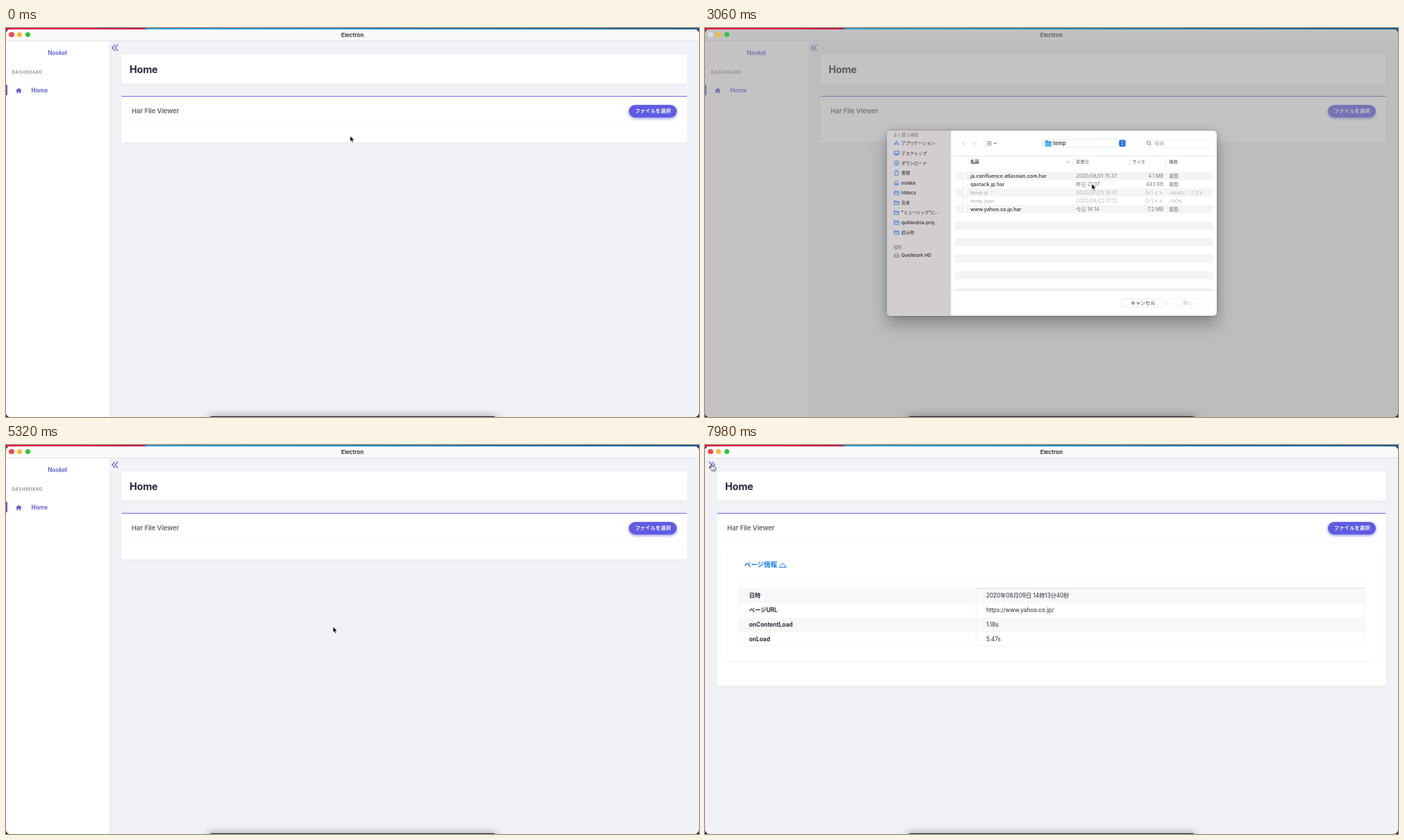
Write an HTML page that moves like this. It is 998 by 561 pixels and loops after 8 s.

```html
<!DOCTYPE html>
<html lang="ja">
<head>
<meta charset="utf-8">
<title>Har File Viewer</title>
<style>
html, body { margin: 0; width: 100%; height: 100%; overflow: hidden; background: #11131f; }
body { font: 8.3px/1 Inter, "Noto Sans CJK JP", sans-serif; color: #2b2b3f; }
div, svg { position: absolute; box-sizing: border-box; }
#stage { left: 0; top: 0; width: 998px; height: 561px; overflow: hidden; cursor: default; }
#stage, #stage * { animation-duration: 8s; animation-iteration-count: infinite; animation-timing-function: linear; }
.t { white-space: nowrap; transform: translateY(-50%); }
.b { font-weight: 700; }
.sb { font-weight: 600; }

/* desktop and window */
.strip { inset: 0 0 auto; height: 3px; background: linear-gradient(90deg, #e3164a 0 108px, #b8164c 200px, #2a9ad6 201px, #2388c4 480px, #0b5a94); }
.window { inset: 1.5px 0 0; border-radius: 6px; overflow: hidden; background: #f1f2f7; }
.page { left: 0; top: -1.5px; width: 998px; height: 561px; }
.bar { left: 0; top: 0; width: 998px; height: 18.5px; background: #fafafa; border-bottom: 1px solid #e1e1e3; }
.light { width: 7.2px; height: 7.2px; top: 6.2px; border-radius: 50%; }
.red { background: #f9484d; animation-name: red; }
.side { left: 0; top: 18.5px; width: 149px; height: 543px; background: #fff; box-shadow: 0 2px 5px #0000000a; animation-name: side; }
.side .t { margin-top: -18.5px; }
.violet { color: #5a55dc; }
.main { left: 149px; top: 0; right: 0; height: 561px; animation-name: main; }
.card { left: 17.3px; right: 17.3px; background: #fff; box-shadow: 0 2px 5px #00000008; border-radius: 1.5px; }
.viewer { top: 98px; height: 66.5px; border-top: 1.6px solid #6d69d8; animation-name: grow; animation-timing-function: step-end !important; }
.pill { left: 748.5px; top: 111px; width: 69px; height: 18px; }
.btn { right: 31.6px; top: 111px; width: 69px; height: 18px; border-radius: 9px; background: #5f5be3;
  color: #fff; font: 700 7.13px/17.4px Inter, "Noto Sans CJK JP", sans-serif; letter-spacing: .3px; text-align: center; white-space: nowrap;
  box-shadow: 0 1.5px 4px #8d89e6; animation-name: btn; }
.info { inset: 0; animation-name: info; animation-timing-function: step-end !important; }
.panel { left: 32px; right: 31px; top: 150px; height: 161px; box-shadow: 0 2px 5px #00000008; }
.table { left: 47.5px; right: 47.5px; top: 206px; height: 84px; border: .6px solid #f4f4f5; }
.row { left: 0; right: 0; height: 21px; }
.row:nth-child(odd) { background: #f8f8f8; }
.row .t { top: 10px; }
.row .v { left: calc(37.9% + 15px); letter-spacing: -.08px; }
.edge { left: 37.9%; right: 0; top: -1px; height: 1px; background: #dcdee2; }
.split { left: 37.9%; top: 0; bottom: 0; width: .6px; background: #f1f1f3; }
.chev { fill: none; stroke: #5753cf; stroke-width: 1.1; }
.left { animation-name: before; animation-timing-function: step-end !important; }
.right { animation-name: after; animation-timing-function: step-end !important; }
.wash { inset: 0; background: #fff; opacity: 0; animation-name: wash; }
.dim { inset: 0; background: #000; opacity: 0; animation-name: dim; }
.dock { left: 290px; top: 559.6px; width: 418px; height: 20px; border-radius: 7px; background: #24213f; box-shadow: 0 0 13px #0000005c, 0 0 1px #555; }

/* file sheet */
.sheet { left: 261.7px; top: 148.4px; width: 475.3px; height: 266.2px; border-radius: 5px; overflow: hidden; background: #fff;
  box-shadow: 0 12px 24px #0000004a, 0 0 12px #00000022, 0 0 0 .5px #00000030; opacity: 0; animation-name: sheet; }
.sheet svg { left: 0; top: 0; }
.sheet text { font-family: Inter, "Noto Sans CJK JP", sans-serif; }
.places { animation-name: places; }
.on, .blank { opacity: 0; animation-timing-function: step-end !important; }
.on { animation-name: pick; }
.blank { inset: 0; background: linear-gradient(#f1f1f2, #eeeeef 30px, #e9eaed 38px); animation-name: blank; }

/* pointer */
.pointer { left: 0; top: 0; width: 0; height: 0; animation-name: pointer; animation-timing-function: ease-in-out !important; }
.pointer svg { overflow: visible; left: 0; top: 0; animation-timing-function: step-end !important; }
.arrow { animation-name: arrow; }
.hand { animation-name: hand; }

@keyframes pointer {
  0%, 4.5% { transform: translate(495.5px, 155.5px); }
  12.8%, 24% { transform: translate(907.2px, 121.5px); }
  32.2%, 35% { transform: translate(602px, 205px); }
  43%, 67.5% { transform: translate(471px, 262px); }
  77.5%, 88.8% { transform: translate(156.3px, 26px); }
  96%, 100% { transform: translate(9.6px, 27.5px); }
}
@keyframes arrow { 0% { opacity: 1; } 12.2% { opacity: 0; } 25.3% { opacity: 1; } 76.6% { opacity: 0; } 90% { opacity: 1; } 95.4%, 100% { opacity: 0; } }
@keyframes hand { 0% { opacity: 0; } 12.2% { opacity: 1; } 25.3% { opacity: 0; } 76.6% { opacity: 1; } 90% { opacity: 0; } 95.4%, 100% { opacity: 1; } }
@keyframes btn {
  0%, 12.2% { background: #5f5be3; box-shadow: 0 1.5px 4px #8d89e6; }
  13.2%, 35% { background: #3a36da; box-shadow: 0 0 0 #8d89e600; }
  36.5%, 67% { background: #5f5be3; box-shadow: 0 1.5px 4px #8d89e6; }
  68%, 90% { background: #5551e6; box-shadow: 0 .5px 1px #8d89e666; }
  92%, 100% { background: #5f5be3; box-shadow: 0 1.5px 4px #8d89e6; }
}
@keyframes dim { 0%, 31.9% { opacity: 0; } 33.25%, 35% { opacity: .13; } 36.5%, 59.5% { opacity: .235; } 61% { opacity: .13; } 62.5%, 100% { opacity: 0; } }
@keyframes wash { 0%, 35% { opacity: 0; } 36.5%, 59.5% { opacity: .36; } 61% { opacity: .2; } 62.5%, 100% { opacity: 0; } }
@keyframes red { 0%, 31.9% { background: #f9484d; } 33%, 61.5% { background: #dedede; } 62.5%, 100% { background: #f9484d; } }
@keyframes sheet {
  0%, 31.9% { opacity: 0; transform: translateY(-20px); }
  33% { opacity: 1; }
  33.25%, 35% { transform: translateY(-9.5px); }
  36.5%, 59.5% { transform: none; }
  61% { opacity: 1; transform: translateY(-8.5px); }
  62.5%, 100% { opacity: 0; transform: translateY(-20px); }
}
@keyframes places { 0%, 35% { fill: #e0dbde; } 36.5%, 100% { fill: #d3cdd0; } }
@keyframes pick { 0% { opacity: 0; } 46% { opacity: 1; } 64%, 100% { opacity: 0; } }
@keyframes blank { 0% { opacity: 0; } 59.5% { opacity: 1; } 64%, 100% { opacity: 0; } }
@keyframes grow { 0% { height: 66.5px; } 68%, 100% { height: 249px; } }
@keyframes info { 0% { opacity: 0; } 68%, 100% { opacity: 1; } }
@keyframes main { 0%, 88.2% { left: 149px; animation-timing-function: ease; } 93.5%, 100% { left: 0; } }
@keyframes side { 0%, 88.2% { transform: none; animation-timing-function: ease; } 93.5%, 100% { transform: translateX(-156px); } }
@keyframes before { 0% { opacity: 1; } 88.2%, 100% { opacity: 0; } }
@keyframes after { 0% { opacity: 0; } 88.2%, 100% { opacity: 1; } }
</style>
</head>
<body>
<div id="stage">
  <div class="strip"></div>
  <div class="window">
    <div class="page">
      <div class="main">
        <svg class="chev left" style="left:3px;top:23px" width="10" height="11"><path d="M5.2.8.8 5.5l4.4 4.7M9.4.8 5 5.5l4.4 4.7"/></svg>
        <svg class="chev right" style="left:5px;top:23px" width="10" height="11"><path d="M.6.8 5 5.5.6 10.2M4.8.8l4.4 4.7-4.4 4.7"/></svg>
        <div class="card" style="top:38px;height:42px"></div>
        <div class="t b" style="left:29px;top:60px;font-size:14.3px;letter-spacing:-.15px;color:#27273f">Home</div>
        <div class="card viewer"></div>
        <div class="t sb" style="left:32px;top:120px;font-size:9.5px;letter-spacing:-.08px;color:#62626c">Har File Viewer</div>
        <div style="left:26px;right:26px;top:140.4px;height:.7px;background:#f6f6fa"></div>
        <div class="btn">ファイルを選択</div>
        <div class="info">
          <div class="panel"></div>
          <div class="t b" style="left:56.5px;top:173px;font-size:9.5px;color:#167be8">ページ情報</div>
          <svg style="left:106px;top:168px" width="12" height="10" fill="none" stroke="#167be8"><path d="M1 8.3 6 2.2l5 6.1z"/></svg>
          <div style="left:41px;right:41px;top:194.5px;height:.6px;background:#f8f8fb"></div>
          <div class="table" id="table"></div>
        </div>
      </div>
      <div class="side">
        <div class="t sb violet" style="left:0;width:148px;text-align:center;top:36px">Noskel</div>
        <div class="t sb" style="left:8.5px;top:64px;font-size:5.94px;letter-spacing:.77px;color:#85858d">DASHBOARD</div>
        <div style="left:0;top:63.5px;width:1.8px;height:15px;background:#5f5be3"></div>
        <svg style="left:13.5px;top:67px" width="9" height="9" fill="#5a55dc"><path d="M4.3.8 8.4 4.3l-.6.6-.7-.5V8H5.2V5.7H3.4V8H1.5V4.4l-.7.5-.6-.6zM6.4 1.2h1v1.5l-1-.9z"/></svg>
        <div class="t sb violet" style="left:36.5px;top:90px">Home</div>
      </div>
      <div class="bar"></div>
      <div class="t b" style="left:0;width:998px;text-align:center;top:9.5px;font-size:8px;color:#3b3b3d">Electron</div>
    </div>
    <div class="wash"></div>
    <div class="dim"></div>
    <div class="light red" style="left:4.4px;top:4.7px"></div>
    <div class="light" style="left:16.2px;top:4.7px;background:#f8b92d"></div>
    <div class="light" style="left:28px;top:4.7px;background:#2bc641"></div>
  </div>
  <div class="dock"></div>
  <div class="sheet">
    <svg id="files" width="475.3" height="266.2" viewBox="261.7 148.4 475.3 266.2"></svg>
    <div class="blank"></div>
  </div>
  <div class="pointer">
    <svg class="arrow" width="1" height="1"><path d="M0 0v8.6l2-1.8 1.3 3 1.5-.6-1.3-3h2.8z" fill="#000" stroke="#fff" stroke-width=".7"/></svg>
    <svg class="hand" width="1" height="1"><path d="M-1 .7Q0-.5.9.7l.4 3.2 1-.2.9.5 1-.1.7.6 1 .2q.5 1.7-.2 3.1l-.5 1.9H.4L-1 7.6-3.6 5.2q0-1.3 1.4-.8l1.6 1z" fill="#fff" stroke="#222230" stroke-width=".8"/><path d="M1.3 6.8v1.8M2.7 6.8v1.8M4 6.8v1.8" stroke="#222230" stroke-width=".5"/></svg>
  </div>
</div>
<script>
const rowsOf = [
  ['日時', '2020年08月09日 14時13分40秒'],
  ['ページURL', 'https://www.yahoo.co.jp/'],
  ['onContentLoad', '1.18s'],
  ['onLoad', '5.47s']
];
document.getElementById('table').innerHTML = rowsOf.map(([k, v], i) =>
  `<div class="row" style="top:${i * 21}px"><div class="t b" style="left:15px">${k}</div><div class="t v">${v}</div></div>`
).join('') + '<div class="edge"></div><div class="split"></div>';

// text centred vertically on y
const text = (s, x, y, size, fill = '#2c2c2e', extra = '') =>
  `<text x="${x}" y="${y + size * .364}" font-size="${size}" fill="${fill}" ${extra}>${s}</text>`;
const rect = (x, y, w, h, fill, r = 0, extra = '') =>
  `<rect x="${x}" y="${y}" width="${w}" height="${h}" rx="${r}" fill="${fill}" ${extra}/>`;
const line = (d, stroke, w = .7, extra = '') =>
  `<path d="${d}" fill="none" stroke="${stroke}" stroke-width="${w}" ${extra}/>`;
const medium = 'font-weight="500"', bold = 'font-weight="700"', end = 'text-anchor="end"', mid = 'text-anchor="middle"';
const rim = 'stroke="#dcdcde" stroke-width=".6"';

const icons = {
  app: 'M-3 3 0-3.2 3 3M-3.6 1h7.2',
  desk: 'M-3.5-2.8h7v4.6h-7zM-3.5.6h7M-2 3h4',
  down: 'M-3.4 0a3.4 3.4 0 1 0 6.8 0a3.4 3.4 0 1 0-6.8 0M0-1.8v3.4M-1.4.3 0 1.7 1.4.3',
  doc: 'M-2.4-3.3h3l1.8 1.8v4.8h-4.8zM.6-3.3v1.8h1.8',
  home: 'M-3.6 0 0-3.2 3.6 0M-2.5-.8v3.8h5v-3.8M-.7 3V1H.7v2',
  dir: 'M-3.4-2.5h2.6l.8.9h3.4v4.3h-6.8zM-3.4-.6h6.8',
  disk: 'M-3.4.4-2.2-2.4h4.4L3.4.4v2.2h-6.8zM-3.4.4h6.8'
};
const places = [
  ['app', 'アプリケーション'], ['desk', 'デスクトップ'], ['down', 'ダウンロード'], ['doc', '書類'],
  ['home', 'mokke'], ['dir', 'htdocs'], ['dir', '音楽'], ['dir', '*ミュージック*に…'],
  ['dir', 'quillandria-proj...'], ['dir', '読み物']
];
const place = ([icon, name], y, color) =>
  line(icons[icon], color, .8, `transform="translate(275.5 ${y})"`) +
  text(name, 282.5, y, /^[\x00-\x7f]+$/.test(name) ? 6.5 : 6.1, '#2e2a2d', medium);

const files = [
  ['ja.confluence.atlassian.com.har', '2020/08/01 15:37', '4.1 MB', '書類'],
  ['qastack.jp.har', '昨日 21:07', '443 KB', '書類'],
  ['temp.js', '2020/07/25 10:41', '0バイト', 'JavaSc...リプト'],
  ['temp.json', '2020/08/02 17:12', '0バイト', 'JSON'],
  ['www.yahoo.co.jp.har', '今日 14:14', '7.2 MB', '書類']
];
const pitch = 11.9, top0 = 208;
const file = ([name, date, size, kind], i, chosen) => {
  const y = top0 + pitch * (i + .5), off = i === 2 || i === 3;
  const main = chosen ? '#fff' : off ? '#b6b6b8' : '#2c2c2e';
  const sub = chosen ? '#e4eeff' : off ? '#b6b6b8' : '#77777a';
  return `<path d="M371.5 ${y - 4}h4l2 2v6h-6z" fill="#fff" stroke="#d4d4d6" stroke-width=".4"/>` +
    text(name, 382, y, 7.2, main, medium) + text(date, 534, y, 7.2, sub) +
    text(size, 660, y, 7.2, sub, end) + text(kind, 668, y, 6.8, sub);
};
const chosen = 4;

let s = rect(261, 148, 93, 267, '#d3cdd0', 0, 'class="places"');
s += text('よく使う項目', 271, 154, 6, '#8d868a', bold) + text('場所', 271, 316, 6, '#8d868a', bold);
places.forEach((p, i) => s += place(p, 166.5 + i * 14.3, '#1f74e0'));
s += place(['disk', 'Quellmark HD'], 328.5, '#77727a');

// toolbar
s += line('M373.5 163.5l-3 3.2 3 3.2M386 163.5l3 3.2-3 3.2', '#b9b9bc', .9);
s += rect(400.5, 161, 23, 11.5, '#fff', 2.5, 'stroke="#ececee" stroke-width=".6"');
s += line('M404.5 164.4h1M404.5 166.8h1M404.5 169.2h1M406.7 164.4h5.6M406.7 166.8h5.6M406.7 169.2h5.6', '#555', .8);
s += line('M415.8 165.6l2 2 2-2', '#444', 1);
s += rect(485, 161, 121.5, 11.5, '#fff', 2.5, rim);
s += `<path d="M489.5 162.6h3.6l1 1.1h4.6v7.4h-9.2z" fill="#2f8fcf"/>` + rect(489.5, 165, 9.2, 6.1, '#58b6ec', .6);
s += text('temp', 501.3, 166.6, 7.5, '#2c2c2e', medium);
s += rect(596, 162, 9.3, 9.3, '#1b6fe9', 2) + line('M599 165.9l1.65-1.7 1.65 1.7M599 167.5l1.65 1.7 1.65-1.7', '#fff', .9);
s += rect(631, 160.8, 94, 11.8, '#fff', 2.5, 'stroke="#e9e9eb" stroke-width=".6"');
s += '<circle cx="638.6" cy="166" r="2.5" fill="none" stroke="#666" stroke-width=".8"/>' + line('M640.4 167.9l2.2 2.2', '#666', .9);
s += text('検索', 647, 166.8, 7.3, '#a8a8ab');

// list
s += line('M354 185h383', '#dededf');
s += line('M530 187.5v12M611 187.5v12M663.5 187.5v12', '#d9d9db');
s += text('名前', 382, 193.3, 6.2, '#2c2c2e', bold) + line('M520 194.8l2-2 2 2', '#77777a', .8);
s += text('変更日', 534, 193.3, 6.2, '#555558') + text('サイズ', 615, 193.3, 6.2, '#555558') + text('種類', 668, 193.3, 6.2, '#555558');
for (let i = 0; i < 15; i += 2) s += rect(360, top0 + pitch * i, 371, Math.min(pitch, 378.4 - top0 - pitch * i), '#f4f4f5', 2);
files.forEach((f, i) => s += file(f, i));
s += `<g class="on">${rect(360, top0 + pitch * chosen, 371, pitch, '#0a5bd3', 2)}${file(files[chosen], chosen, true)}</g>`;

// footer
s += line('M354 378.8h383', '#dfdfe1');
s += rect(600, 391, 61, 12, '#fff', 2.5, rim) + text('キャンセル', 630.5, 396.8, 7.1, '#2c2c2e', mid);
s += rect(665, 391, 60.5, 12, '#fff', 2.5, 'stroke="#efeff0" stroke-width=".6"') + text('開く', 695, 396.8, 7, '#c0c0c3', mid);
s += `<g class="on">${rect(665, 391, 60.5, 12, '#1b74f2', 2.5)}${text('開く', 695, 396.8, 7, '#fff', mid)}</g>`;
document.getElementById('files').innerHTML = s;
</script>
</body>
</html>
```
